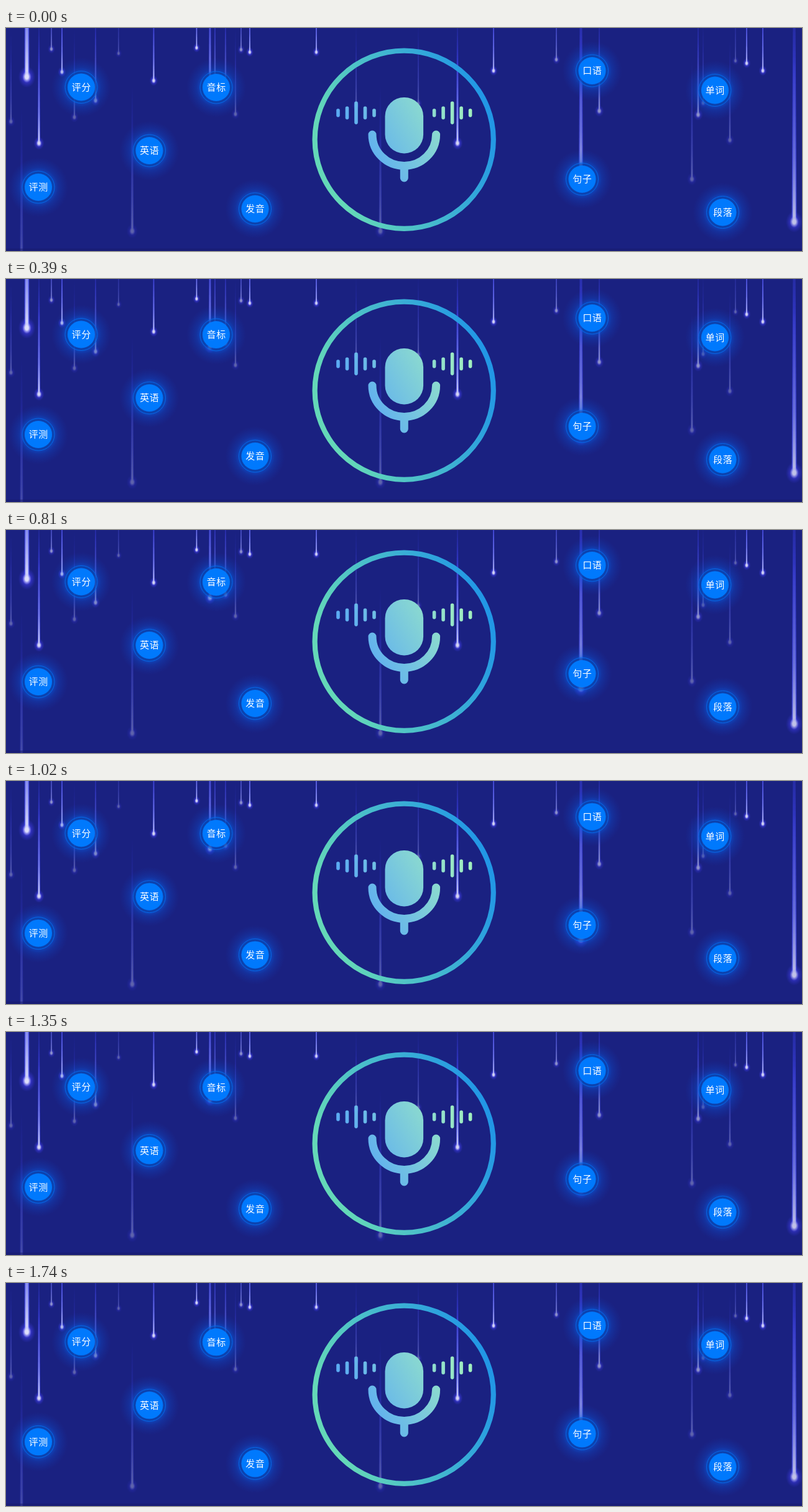
These frames come from a looping animation (1280x360 px, 1800 ms). An HTML page:

```html
<!DOCTYPE html>
<html lang="zh-CN">
<head>
<meta charset="utf-8">
<title>语音评测</title>
<style>
  html, body { margin: 0; width: 100%; height: 100%; overflow: hidden; background: #1a2181; }
  svg { display: block; width: 100vw; height: 100vh; }
  text {
    font: 15px "Noto Sans CJK SC", "Noto Sans CJK", sans-serif;
    letter-spacing: .5px; fill: #fff; text-anchor: middle;
  }
</style>
</head>
<body>
<svg viewBox="0 0 1280 360">
  <defs>
    <linearGradient id="tail" x1="0" y1="0" x2="0" y2="1">
      <stop offset="0" stop-color="#3f42f0" stop-opacity="0"/>
      <stop offset=".4" stop-color="#4347f4" stop-opacity=".7"/>
      <stop offset="1" stop-color="#5c62fa" stop-opacity=".85"/>
    </linearGradient>
    <linearGradient id="core" x1="0" y1="0" x2="0" y2="1">
      <stop offset=".35" stop-color="#9aa2ff" stop-opacity="0"/>
      <stop offset=".75" stop-color="#a8b0fa" stop-opacity=".5"/>
      <stop offset="1" stop-color="#e0e2fa" stop-opacity=".95"/>
    </linearGradient>
    <radialGradient id="halo">
      <stop offset="0" stop-color="#5a50ff"/>
      <stop offset=".45" stop-color="#4640f4" stop-opacity=".6"/>
      <stop offset="1" stop-color="#3a38e0" stop-opacity="0"/>
    </radialGradient>
    <radialGradient id="spark">
      <stop offset=".35" stop-color="#dedffa"/>
      <stop offset="1" stop-color="#a8a8fa" stop-opacity="0"/>
    </radialGradient>
    <radialGradient id="glow">
      <stop offset=".5" stop-color="#0560e8" stop-opacity=".62"/>
      <stop offset=".66" stop-color="#0a56dc" stop-opacity=".3"/>
      <stop offset="1" stop-color="#1040c0" stop-opacity="0"/>
    </radialGradient>
    <linearGradient id="ringFill" gradientUnits="userSpaceOnUse" x1="530" y1="240" x2="785" y2="150">
      <stop offset="0" stop-color="#64d8b8"/>
      <stop offset="1" stop-color="#2196e6"/>
    </linearGradient>
    <linearGradient id="micFill" gradientUnits="userSpaceOnUse" x1="570" y1="210" x2="750" y2="110">
      <stop offset="0" stop-color="#5aaaf4"/>
      <stop offset="1" stop-color="#a8f6ba"/>
    </linearGradient>
  </defs>
  <g id="streaks"></g>
  <rect y="356" width="1280" height="4" fill="#161b6c" opacity=".5"/>
  <g fill="none" stroke="url(#micFill)" stroke-linecap="round">
    <circle cx="640.2" cy="180.2" r="143.6" stroke="url(#ringFill)" stroke-width="8.2"/>
    <path d="M589 172A51.3 50.5 0 0 0 691.6 172M640.3 223V242" stroke-width="13"/>
    <path id="bars" stroke-width="5.6"/>
    <rect x="609.5" y="112" width="61.6" height="90.4" rx="30.5" fill="url(#micFill)" stroke="none"/>
  </g>
  <g id="badges"></g>
</svg>
<script>
const $ = id => document.getElementById(id);

// Streaks by depth; each point is where a head hangs
const layers = [
  { size: .8, opacity: .35, heads: [
    [8, 151], [25, 400], [110, 144], [181, 41], [203, 328], [369, 139], [563, 125],
    [602, 328], [663, 122], [1103, 244], [1121, 121], [1164, 181], [1173, 53]] },
  { size: 1, opacity: .6, heads: [
    [73, 34], [144, 117], [336, 92], [353, 104], [378, 35], [885, 51], [954, 134], [1113, 140]] },
  { size: 1, opacity: .95, heads: [
    [53, 186], [90, 71], [237.5, 85], [306.5, 32], [392, 39], [499, 39],
    [726, 186], [784, 69], [1191, 57], [1217, 69]] },
  { size: 1.4, opacity: .85, heads: [[328, 109], [924.5, 254], [1267.5, 313]] },
  { size: 2.9, opacity: 1, heads: [[33.5, 79]] }
];

const badges = [
  ["评分", 121, 95.5], ["音标", 338, 96], ["口语", 942.5, 69],
  ["单词", 1140, 100.5], ["英语", 230.5, 198], ["评测", 52, 257],
  ["发音", 400.5, 292], ["句子", 926.5, 244], ["段落", 1152.5, 297.5]
];

const taper = (x, y, top, w) =>
  `M${x - w * .2} ${top}L${x - w / 2} ${y}H${x + w / 2}L${x + w * .2} ${top}Z`;

// Longer falls are wider
function streak(x, y, size, opacity) {
  const w = size * (1.8 + y / 80), top = y - 50 * w, r = w * .7 + 1.6;
  return `<g opacity="${opacity}">
    <ellipse cx="${x}" cy="${y}" rx="${r * 1.9}" ry="${r * 2.4}" fill="url(#halo)"/>
    <path d="${taper(x, y, top, w)}" fill="url(#tail)"/>
    <path d="${taper(x, y, top, w * .6)}" fill="url(#core)"/>
    <ellipse cx="${x}" cy="${y}" rx="${r}" ry="${r * 1.3}" fill="url(#spark)"/></g>`;
}

function badge([label, x, y]) {
  return `<g transform="translate(${x} ${y})">
    <circle r="48" fill="url(#glow)"/>
    <circle r="23.5" fill="none" stroke="#0a3f9e" stroke-width="3" opacity=".5"/>
    <circle r="26" fill="none" stroke="#0768e4"/>
    <circle r="22" fill="#0079fd"/>
    <text x=".25" y="5.4">${label}</text></g>`;
}

$("streaks").innerHTML = layers.map(({ size, opacity, heads }) =>
  heads.map(([x, y]) => streak(x, y, size, opacity)).join("")).join("");
$("badges").innerHTML = badges.map(badge).join("");

// Five sound bars on each side, tallest in the middle
let bars = "";
for (const middle of [563, 717.6]) {
  for (let i = -2; i <= 2; i++) {
    const h = 15.6 / 2 ** Math.abs(i);
    bars += `M${middle + i * 14.5} ${137 - h}v${2 * h}`;
  }
}
$("bars").setAttribute("d", bars);

// 40 steps per loop, held for 30 and 60 ms in turn
function draw(ms) {
  const t = ms % 1800;
  const step = 2 * Math.floor(t / 90) + (t % 90 >= 30 ? 1 : 0);
  const lift = 13.3 * (1 - Math.abs(step - 20) / 20);
  $("badges").setAttribute("transform", `translate(0 ${-lift})`);
}

const start = performance.now();
function tick() {
  draw(performance.now() - start);
  requestAnimationFrame(tick);
}
tick();
</script>
</body>
</html>
```
